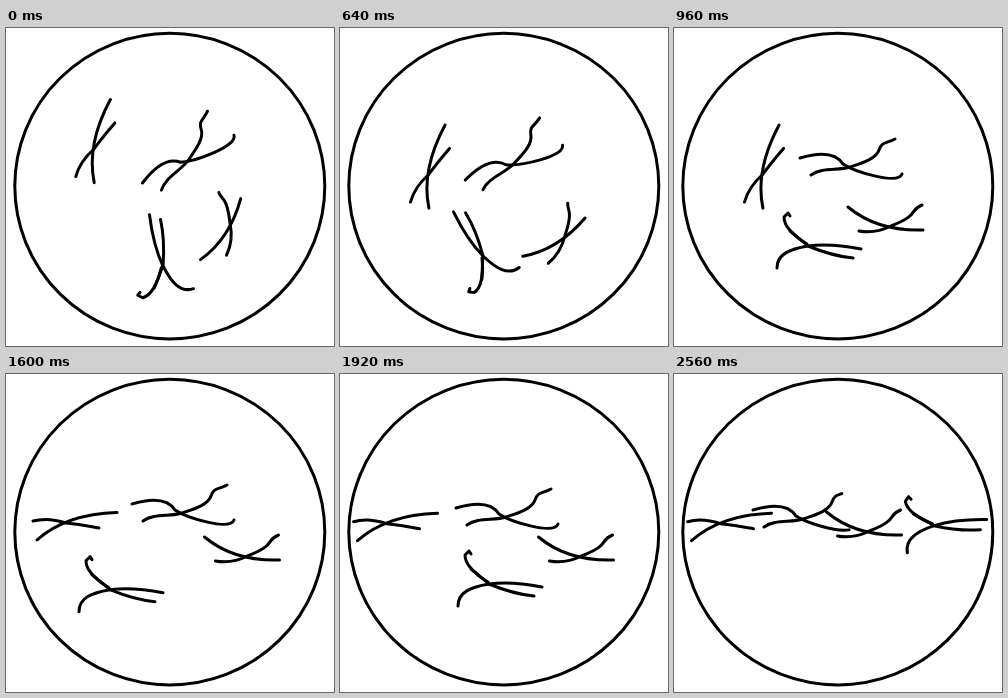
These frames come from a looping animation (328 px wide and 318 px high, 7.84 s). An HTML page:

```html
<!DOCTYPE html>
<html lang="en">
<head>
<meta charset="utf-8">
<title>Chromosomes lining up in a cell</title>
<style>
  html, body { margin: 0; width: 100%; height: 100%; overflow: hidden; background: #fff; }
  svg { display: block; width: 100%; height: 100%; }
  ellipse, path {
    fill: none; stroke: #000; stroke-width: 3;
    stroke-linecap: round; stroke-linejoin: round;
  }
</style>
</head>
<body>
<svg id="stage" viewBox="0 0 328 318">
  <ellipse cx="163.8" cy="158.1" rx="155" ry="152.8"/>
</svg>
<script>
const STEP = 320;
const LOOP = 7840;
const stage = document.getElementById('stage');

// Each pose holds from its step on; keep is the visible share of every strand.
const pose = (step, x, y, turn = 0, keep = 1) => ({ step, x, y, turn, keep });

// Strands are curves around the point where they cross.
const chromosomes = [
  {
    strands: ['M-29 17Q0-9 51-10.5', 'M-33-2Q-18-6 0 0Q12 1 33 5'],
    poses: [
      pose(0, 88, 121, -60),
      pose(1, 88.7, 146.5, -60),
      pose(4, 82, 135),
      pose(5, 60, 149),
      pose(6, 46.5, 149.7)
    ]
  },
  {
    strands: [
      'M-50-9C-30-15-14-14-7-3C5 5 48 18 52 7',
      'M-39 8C-28 0-12 4 0 0S26-8 29-17S36-23 45-28'
    ],
    poses: [
      pose(0, 182, 132.5, -36.5),
      pose(1, 173.5, 136, -28.5),
      pose(3, 176, 139),
      pose(6, 166, 143),
      pose(7, 129, 145, 0, 0.93)
    ]
  },
  {
    strands: [
      'M-31 22C-31 8-18 3 0 0Q22-3 53 3',
      'M-18-30L-20-33L-24-29C-24-16-8-8 0 0Q24 10 45 12',
      'M-18-15Q-10-7-1-2'
    ],
    poses: [
      pose(0, 157, 238, -108),
      pose(2, 143, 228, -127),
      pose(3, 134, 218),
      pose(5, 104, 215.7),
      pose(6, 149, 210),
      pose(7, 257, 182),
      pose(8, 260, 151.7, -10)
    ]
  },
  {
    strands: [
      'M-43-19C-25-4 0 5 32 4',
      'M-32 5Q-16 8 0 0C30-12 17-15 31-21'
    ],
    poses: [
      pose(0, 224, 195, -75, 0.93),
      pose(2, 225, 207.5, -50, 0.93),
      pose(3, 217, 198),
      pose(5, 241.5, 182),
      pose(7, 195.5, 157)
    ]
  }
];

function add(tag, parent, attributes = {}) {
  const node = document.createElementNS('http://www.w3.org/2000/svg', tag);
  for (const name in attributes) node.setAttribute(name, attributes[name]);
  return parent.appendChild(node);
}

for (const item of chromosomes) {
  item.group = add('g', stage);
  for (const d of item.strands) add('path', item.group, { d, pathLength: 1 });
}

function render(time) {
  const step = Math.floor((time % LOOP) / STEP);
  for (const { group, poses } of chromosomes) {
    const { x, y, turn, keep } = poses.filter(p => p.step <= step).pop();
    group.setAttribute('transform', `translate(${x} ${y}) rotate(${turn})`);
    group.setAttribute('stroke-dasharray', keep < 1 ? `${keep} 2` : 'none');
  }
}

const start = performance.now();
function tick() {
  render(performance.now() - start);
  requestAnimationFrame(tick);
}
tick();
</script>
</body>
</html>
```
